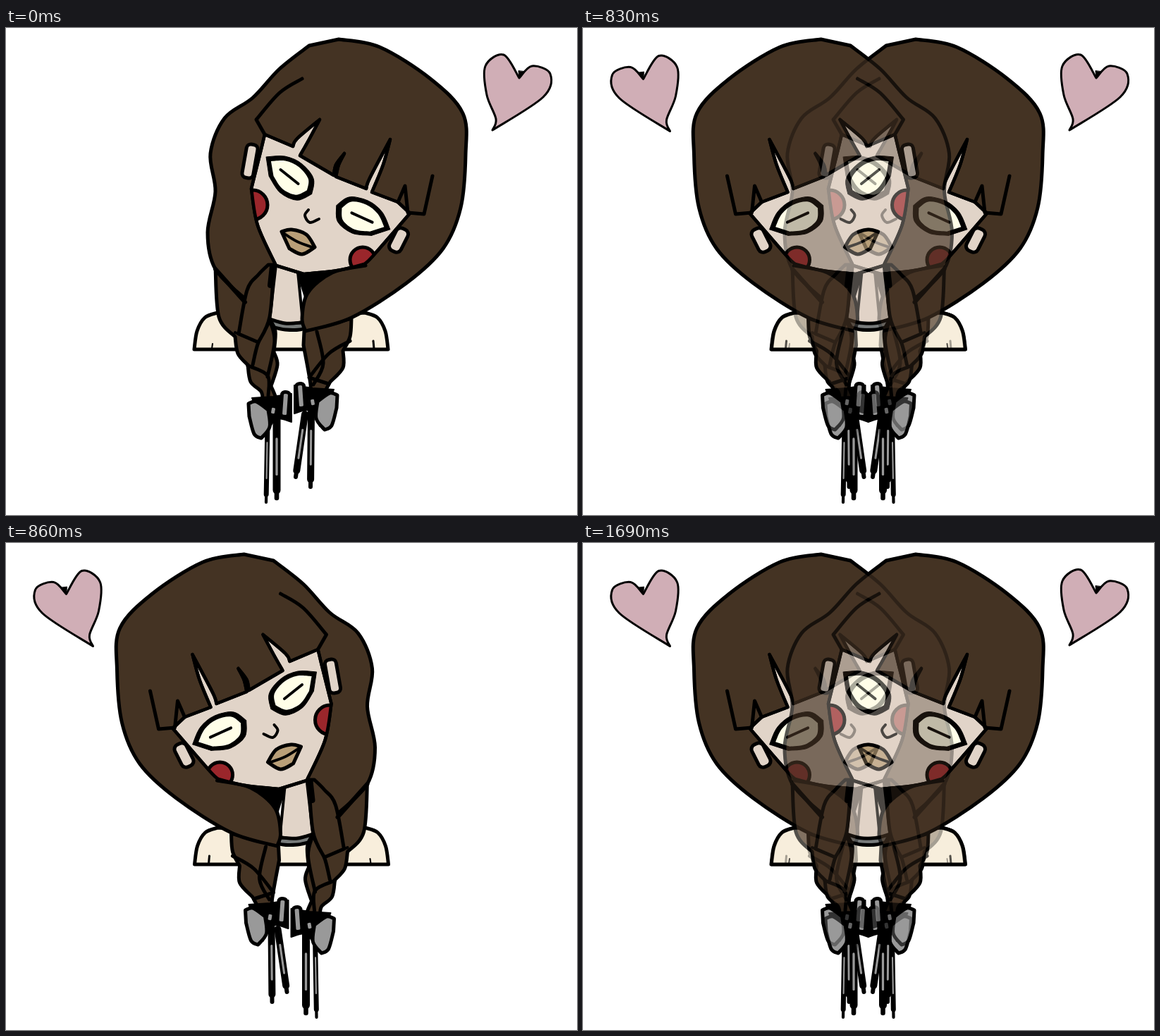
An HTML page with a canvas for the animation above (1.72 s loop, 810x691 px).

```html
<!DOCTYPE html>
<html lang="en">
<head>
<meta charset="utf-8">
<title>Swaying girl</title>
<style>
html, body { margin: 0; width: 100%; height: 100%; overflow: hidden; background: #fff; }
canvas { display: block; width: 810px; height: 691px; }
</style>
</head>
<body>
<canvas id="stage" width="810" height="691"></canvas>
<script>
const W = 810, H = 691, HOLD = 800, STEP = 30, HALF = HOLD + 2 * STEP;
const HAIR = '#443323', SKIN = '#e1d4c8', CREAM = '#f8eedc', EYE = '#fffee8',
      RED = '#9a262b', LIP = '#b99f78', GREY = '#999', INK = '#000', PINK = '#d0aeb6';

// Smooth line through a few key points; "|" marks a sharp corner.
function curve(text) {
  const path = new Path2D();
  let last = null;
  for (const part of text.split('|')) {
    const p = part.trim().split(/\s+/).map(s => s.split(',').map(Number));
    if (last) p.unshift(last); else path.moveTo(...p[0]);
    for (let i = 0; i < p.length - 1; i++) {
      const a = p[i - 1] || p[i], b = p[i], c = p[i + 1], d = p[i + 2] || c;
      path.bezierCurveTo(b[0] + (c[0] - a[0]) / 6, b[1] + (c[1] - a[1]) / 6,
        c[0] - (d[0] - b[0]) / 6, c[1] - (d[1] - b[1]) / 6, c[0], c[1]);
    }
    last = p[p.length - 1];
  }
  return path;
}

function paint(g, path, fill, width = 5) {
  g.fillStyle = fill;
  g.fill(path);
  if (width) { g.lineWidth = width; g.strokeStyle = INK; g.stroke(path); }
}

function shape(g, text, fill, width) {
  const path = curve(text);
  path.closePath();
  paint(g, path, fill, width);
  return path;
}

function line(g, text, width = 5, color = INK) {
  g.lineWidth = width;
  g.strokeStyle = color;
  g.stroke(curve(text));
}

// Draws in local coordinates: origin, angle in degrees, mirrored when dir is -1.
function at(g, x, y, angle, dir, draw) {
  g.save();
  g.translate(x, y);
  g.rotate(angle * Math.PI / 180);
  g.scale(dir, 1);
  draw();
  g.restore();
}

function slab(g, x, y, w, h, angle, fill) {
  at(g, x, y, angle, 1, () => {
    const path = new Path2D();
    path.roundRect(-w / 2, -h / 2, w, h, w / 2.6);
    paint(g, path, fill);
  });
}

function bust(g) {
  shape(g, '267,456 | 271,430 282,411 300,404 | 405,412 | 509,404 | 527,411 538,430 542,456', CREAM);
  line(g, '292,455 293,448', 2);
  line(g, '522,455 521,444', 3);
  shape(g, '383,336 | 374,414 | 396,420 421,417 | 414,346', SKIN, 4);
  shape(g, '374,413 396,419 421,418 | 421,427 396,428 374,423', '#777b7a');
  shape(g, '412,344 | 424,382 | 470,343', INK, 2);
}

function plaits(g) {
  shape(g, '374,335 | 373,412 | 382,430 380,460 | 385,478 376,508 | 384,532 364,530 | 362,516 347,502 343,478 | 329,462 325,438 | 302,410 297,340', HAIR);
  shape(g, '423,430 | 490,412 | 488,438 478,458 | 478,482 460,502 | 446,524 430,524 | 432,506 422,450', HAIR);
  line(g, '374,414 381,444 371,495', 5);
  line(g, '374,416 358,446 350,478', 5);
  line(g, '325,432 358,446', 4);
  line(g, '343,479 371,493 372,522', 5);
  line(g, '441,431 450,476 436,506', 5);
  line(g, '488,444 458,462 430,496 | 458,505', 5);
}

function hair(g) {
  shape(g, '472,16 530,27 602,72 648,121 652,180 645,255 620,313 568,362 490,411 425,430 | 420,412 428,376 463,347 510,337 | 383,337 | 374,345 341,386 | 297,342 286,290 297,232 290,178 310,128 350,99 388,58 430,25', HAIR);
  shape(g, '380,336 | 374,410 358,446 | 330,434 | 342,372 358,350 372,336', HAIR);
  line(g, '297,342 339,389', 6);
  line(g, '378,338 375,365', 8);
}

function eye(g, x, y, angle, dir) {
  const almond = '-43,-4 | -22,-20 4,-25 30,-17 40,2 | 28,21 2,26 -24,16';
  at(g, x, y, angle, dir, () => {
    shape(g, almond, INK, 1);
    g.save();
    g.scale(0.79, 0.76);
    shape(g, almond, EYE, 0);
    g.restore();
    line(g, '-16,-1 16,1', 4);
  });
}

function cheek(g, x, y, r) {
  const path = new Path2D();
  path.arc(x, y, r, 0, 2 * Math.PI);
  paint(g, path, RED);
}

function face(g) {
  slab(g, 346, 189, 16, 48, 10, SKIN);
  slab(g, 557, 301, 18, 35, 27, SKIN);

  const outline = shape(g, '367,151 | 407,168 | 413,157 445,130 | 430,158 417,181 | 465,209 | 468,194 480,178 | 472,194 468,211 | 511,228 | 516,213 545,158 | 535,194 519,233 | 556,247 | 573,263 | 520,324 508,335 | 470,344 422,349 | 383,337 | 357,280 348,228 | 362,172', SKIN, 4.5);
  g.save();
  g.clip(outline);
  cheek(g, 350, 251, 21);
  cheek(g, 506, 329, 18);
  g.restore();
  g.lineWidth = 4.5;
  g.stroke(outline);

  line(g, '420,72 388,92 355,130 | 367,151', 5);
  line(g, '556,247 | 566,224 | 570,262 | 593,264 | 605,210', 5);

  eye(g, 402, 211, 35, 1);
  eye(g, 505, 269, 28, -1);
  line(g, '429,258 424,266 431,276 444,271', 4);
  shape(g, '391,289 405,286 426,293 438,311 | 420,321 402,313', LIP);
  line(g, '392,290 413,303 437,312', 4);
}

function tail(g, x0, y0, x1, y1, width) {
  const mark = k => `${x0 + (x1 - x0) * k},${y0 + (y1 - y0) * k}`;
  line(g, `${mark(0)} ${mark(0.9)}`, width);
  line(g, `${mark(0.9)} ${mark(1)}`, width * 0.6);
  line(g, `${mark(0.25)} ${mark(0.7)}`, width * 0.3, GREY);
}

function bow(g, x, y, dir) {
  at(g, x, y, 0, dir, () => {
    shape(g, '-30,-18 0,-20 | 26,-24 | 26,16 | 4,12 -10,34', INK, 2);
    slab(g, 17, -9, 11, 35, 4, GREY);
    shape(g, '-35,-10 -24,-13 -7,-1 | -5,23 -17,39 | -27,33 -34,8', GREY);
    slab(g, 0, 0, 10, 13, 10, GREY);
  });
}

function bows(g) {
  tail(g, 371, 560, 369, 673, 7);
  tail(g, 384, 555, 384, 667, 11);
  tail(g, 424, 548, 411, 637, 10);
  tail(g, 433, 545, 432, 651, 10);
  bow(g, 379, 543, 1);
  bow(g, 435, 531, -1);
}

function heart(g) {
  shape(g, '690,145 | 695,129 682,95 680,54 706,38 728,71 | 746,54 772,65 762,98 690,145', PINK, 3);
  shape(g, '727,61 728,72 | 736,62', INK, 1);
}

function sprite(flipped) {
  const c = document.createElement('canvas');
  c.width = W;
  c.height = H;
  const g = c.getContext('2d');
  g.lineJoin = g.lineCap = 'round';
  if (flipped) g.setTransform(-1, 0, 0, 1, 809.5, 0);
  [bust, plaits, hair, face, bows].forEach(draw => draw(g));
  if (flipped) g.setTransform(-1, 0, 0, 1, 813.5, 1.5);
  heart(g);
  return c;
}

const poses = [sprite(false), sprite(true)];
const ctx = document.getElementById('stage').getContext('2d');

function layer(img, mode, alpha) {
  ctx.globalCompositeOperation = mode;
  ctx.globalAlpha = alpha;
  ctx.drawImage(img, 0, 0);
}

// Each pose holds, then the next one fades in over two steps;
// its outer parts appear only once it is the stronger of the two.
function render(t) {
  const turn = Math.floor(t / HALF) % 2;
  const step = Math.max(0, Math.floor((t % HALF - HOLD) / STEP) + 1);
  const now = poses[turn], next = poses[1 - turn];
  ctx.clearRect(0, 0, W, H);
  layer(now, 'source-over', 1);
  if (step) layer(next, 'source-atop', step / 3);
  if (step === 2) layer(next, 'destination-over', 1);
}

const start = performance.now();
function tick() {
  render(performance.now() - start);
  requestAnimationFrame(tick);
}
tick();
</script>
</body>
</html>
```
